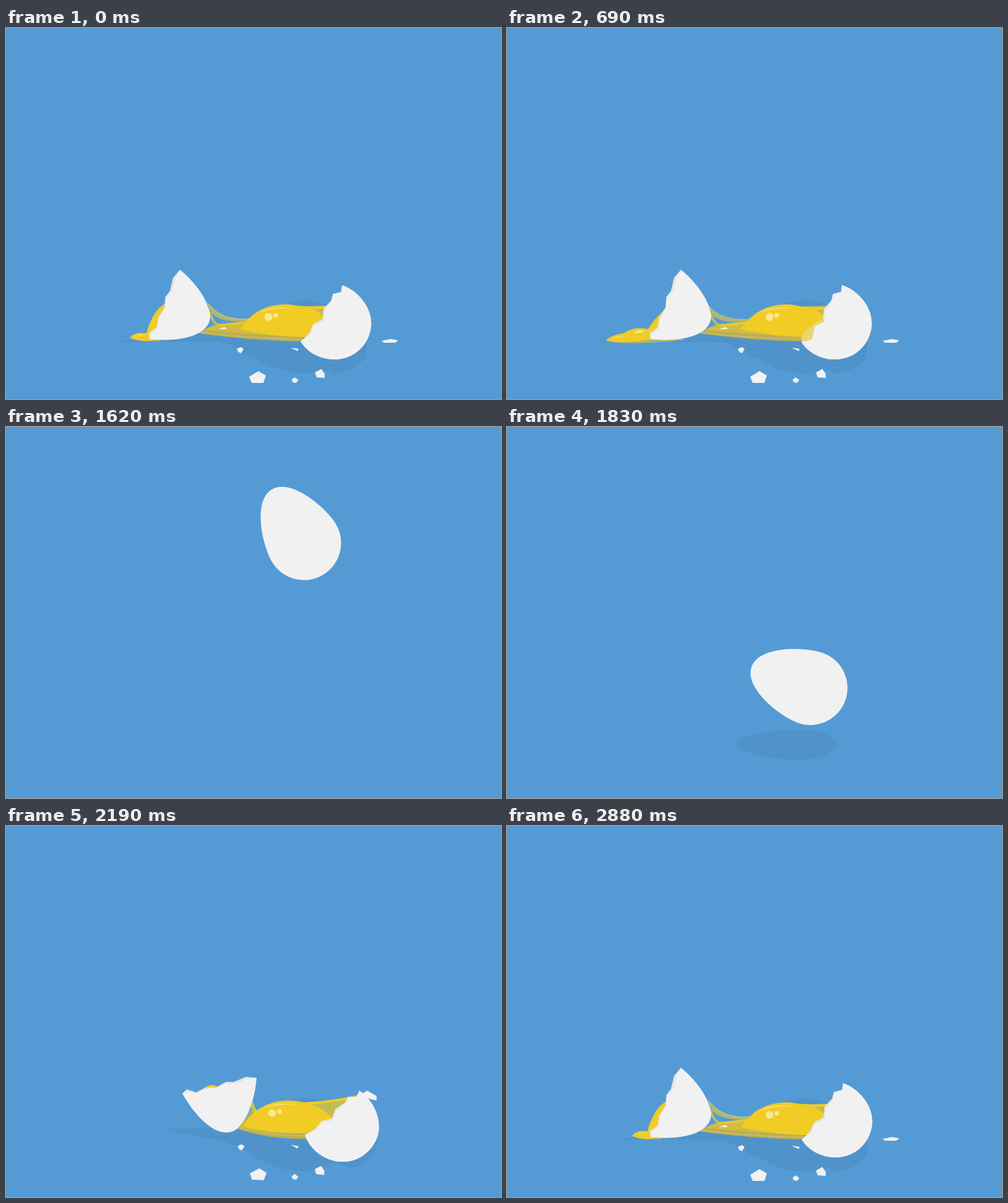
An HTML page that plays this animation: 800 px wide and 600 px high, repeating every 2.91 s.

```html
<!DOCTYPE html>
<html lang="en">
<head>
<meta charset="utf-8">
<title>Dropped egg</title>
<style>
  html, body { margin: 0; width: 100%; height: 100%; overflow: hidden; background: #549bd6; }
  svg { display: block; width: 100vw; height: 100vh; }
</style>
</head>
<body>
<svg id="stage" viewBox="0 0 800 600"></svg>
<script>
const LOOP = 2910, PHASE = 1620, STEP = 30, CRACK = 570;
const YELLOW = '#f0cc25', OCHRE = '#eaba22', WHITE = '#f1f1f1', LIP = '#e5e5e5', PALE = '#f8e88f';
const stage = document.getElementById('stage');

function add(parent, tag, attrs) {
  const node = document.createElementNS('http://www.w3.org/2000/svg', tag);
  set(node, attrs);
  parent.append(node);
  return node;
}
function set(node, attrs) {
  for (const name in attrs) node.setAttribute(name, attrs[name]);
}
function show(node, visible) {
  node.style.display = visible ? '' : 'none';
}

const clamp = v => Math.max(0, Math.min(1, v));
const ease = { linear: k => k, out: k => 1 - (1 - k) ** 2, in: k => k * k };

// Blend two strings of the same structure number by number.
function mix(a, b, k) {
  const ends = b.match(/-?[\d.]+/g);
  let i = 0;
  return a.replace(/-?[\d.]+/g, n => (+n + (ends[i++] - n) * k).toFixed(2));
}
// Each key is [time, value, easing of the way towards it].
function tween(keys, time) {
  const next = keys.findIndex(key => key[0] > time);
  if (next === 0) return keys[0][1];
  if (next < 0) return keys[keys.length - 1][1];
  const [t0, from] = keys[next - 1], [t1, to, name = 'linear'] = keys[next];
  return mix(from, to, ease[name]((time - t0) / (t1 - t0)));
}

// Intact egg
const eggScene = add(stage, 'g', {});
const eggShadow = add(eggScene, 'path', {
  d: 'M367,513C367,500 425,489 470,489C510,489 532,500 532,513C532,527 510,538 470,538C425,538 367,526 367,513Z'
});
const egg = add(eggScene, 'path', {
  d: 'M-60,20.5C-60,-9.5 -37,-80.5 0,-80.5S60,-9.5 60,20.5A60,60 0 0 1 -60,20.5Z', fill: WHITE
});

// Broken egg; each part appears at its first key
const mess = add(stage, 'g', {});
const morphs = [];
function morph(attrs, keys) {
  morphs.push({ node: add(mess, 'path', attrs), keys });
}
const glaze = (opacity, color = YELLOW) => ({ fill: color, 'fill-opacity': opacity });
const line = (color, width, opacity = 1) =>
  ({ fill: 'none', stroke: color, 'stroke-width': width, 'stroke-opacity': opacity });

// Shadow
morph(glaze(.05, '#000'), [
  [570, 'M355,513Q370,526 400,532Q430,537 450,538Q470,538 490,538Q510,537 520,532L530,525Q540,520 540,513L535,505L520,495Q485,487 450,489L420,492L390,500L370,506Z'],
  [900, 'M257,490Q300,502 350,509Q385,522 405,537Q440,558 482,559Q510,556 527,543L560,554Q590,546 600,515L598,500L527,450Q485,432 455,446L420,478L370,488L300,488Z', 'out'],
  [1590, 'M177,508Q250,506 355,509Q385,530 405,535Q440,558 482,559Q505,558 523,552L523,559Q575,556 583,525L582,490L517,447Q485,433 450,446L395,480L300,495L215,502Z', 'out'],
  [2910, 'M107,509Q250,508 355,509Q385,530 405,535Q440,558 482,559Q505,558 523,552L523,559Q575,556 582,525L581,490L517,447Q485,433 450,446L395,480L300,495L150,505Z']
]);

// Egg white between the shells
morph(glaze(.7, OCHRE), [
  [570, 'M430,475Q440,465 450,460Q460,455 470,455L500,470L500,500Q460,500 430,475Z'],
  [900, 'M370,488Q385,478 395,468Q400,462 410,460L500,470L500,506Q420,508 370,488Z', 'out'],
  [1410, 'M311,494Q325,484 338,480Q365,475 400,476L480,480L480,507Q400,506 311,494Z', 'out']
]);
morph(glaze(.4), [
  [570, 'M440,470Q450,460 470,460L495,470L495,488Q460,488 440,470Z'],
  [900, 'M372,485Q388,450 404,462L490,470L490,497Q410,499 372,485Z', 'out'],
  [1410, 'M320,488Q345,477 392,475L480,480L480,499Q400,497 320,488Z', 'out']
]);
morph(line('#e4dc9c', 1.5, .35), [
  [570, 'M440,480Q460,490 480,490'],
  [900, 'M378,488Q420,502 500,501', 'out'],
  [1410, 'M314,492Q390,502 480,503', 'out']
]);

// Web hanging from the left shell
morph(glaze(.58), [
  [570, 'M450,455Q460,460 470,462L470,466Q460,465 452,460Z'],
  [900, 'M396,444Q400,458 408,462L402,466Q396,460 394,452Z', 'out'],
  [1410, 'M325,442Q348,474 392,469L390,474Q345,478 329,458Z', 'out'],
  [1620, 'M325,443Q348,474 392,470L390,474Q345,478 329,458Z'],
  [2310, 'M326,449Q345,474 392,471L390,475Q350,479 330,464Z'],
  [2910, 'M328,457Q345,475 390,472L388,476Q350,480 331,470Z']
]);
morph(line('#e0d98f', 1.2, .55), [
  [570, 'M450,455Q460,460 470,462'],
  [900, 'M396,444Q400,458 408,462', 'out'],
  [1410, 'M325,443Q348,474 392,470', 'out'],
  [2310, 'M326,449Q345,474 392,471'],
  [2910, 'M328,457Q345,475 390,472']
]);
morph(line(YELLOW, 3.5, .75), [
  [570, 'M452,460Q460,465 465,466Q468,466 470,466'],
  [900, 'M398,447Q402,462 405,464Q406,466 408,466', 'out'],
  [1410, 'M329,459Q336,480 345,480Q365,479 392,474', 'out'],
  [2310, 'M330,465Q335,479 345,481Q365,480 392,475'],
  [2910, 'M331,471Q336,480 345,481Q365,480 392,475']
]);

// Web towards the right shell
morph(glaze(.7), [
  [570, 'M470,450Q480,448 490,448L495,480L480,490Z'],
  [900, 'M480,447Q520,446 570,435L545,480L500,490Z', 'out'],
  [1590, 'M470,450Q490,451 518,449L516,470L500,480Z']
]);
morph(line(YELLOW, 4), [
  [570, 'M470,452Q480,450 490,450'],
  [900, 'M480,449Q525,447 570,437', 'out'],
  [1590, 'M470,451Q490,453 518,451.5'],
  [2310, 'M470,452Q490,454 518,453.5']
]);

// Yolk
morph(glaze(1), [
  [570, 'M430,470C440,450 455,440 470,440C485,440 500,450 505,465C505,480 495,492 485,492C460,494 440,485 430,470Z'],
  [900, 'M384,486C398,457 428,444 456,444C490,445 512,455 527,472C520,490 505,497 490,496C450,498 410,493 384,486Z', 'out'],
  [1590, 'M378,487C395,462 418,447 452,447C472,447 478,454 495,454C515,462 530,485 510,500C460,501 420,497 378,487Z']
]);
const shine = add(mess, 'g', { fill: PALE });
add(shine, 'circle', { cx: 424.3, cy: 467.3, r: 6.3 });
add(shine, 'circle', { cx: 436, cy: 464.7, r: 3.8 });
add(shine, 'path', { d: 'M406,461Q432,447 463,454Q432,452 406,461Z', 'fill-opacity': .6 });
const shineKeys = [[570, '24 -3'], [900, '6 -3', 'out'], [1590, '0 0']];

// Puddle running out of the left shell
morph(glaze(.62), [
  [1190, 'M262,500Q264,501 266,500L265,498L262,498Z'],
  [1410, 'M225,505Q238,507 252,506L240,500L232,500Z'],
  [1620, 'M222,505Q235,508 252,506L240,500L230,500Z'],
  [2310, 'M183,509Q235,511 287,504L240,487L215,490Z'],
  [2790, 'M150,508Q230,514 272,505L240,488L205,487Z'],
  [2910, 'M142,508Q230,515 268,505L240,489L200,488Z']
]);
morph(glaze(1), [
  [900, 'M320,424Q333,414 345,424L340,440L325,440Z'],
  [1410, 'M258,444Q238,454 226,496L240,490L262,460Z', 'out'],
  [1620, 'M257,446Q238,455 226,496L240,490L262,460Z'],
  [2310, 'M251,459Q238,470 226,490L240,492L262,470Z'],
  [2790, 'M245,471Q232,480 222,492L236,495L262,478Z'],
  [2910, 'M244,474Q231,482 221,492L236,495L262,480Z']
]);
morph(glaze(1), [
  [1190, 'M260,497Q261,496 262,495Q263,495 264,495L266,495L265,498Q262,499 260,497Z'],
  [1410, 'M214,502Q217,496 222,494Q226,494 232,494L246,488L236,505Q222,506 214,502Z'],
  [1590, 'M202,501Q206,495 217,493Q224,494 232,494L246,488L236,506Q215,508 202,501Z'],
  [1620, 'M200,501Q204,495 216,493Q224,494 232,494L246,488L236,506Q215,508 200,501Z'],
  [2310, 'M160,506Q168,496 188,494Q205,481 232,488L246,480L236,503Q185,512 160,506Z'],
  [2790, 'M140,507Q158,497 178,492Q202,485 224,491L246,478L236,503Q172,514 140,507Z'],
  [2910, 'M135,508Q154,498 174,493Q200,486 222,492L246,478L236,503Q168,514 135,508Z']
]);
morph(glaze(.9, PALE), [
  [1620, 'M232,495Q233,494 234,495Q233,496 232,495Z'],
  [2310, 'M205,493Q212,486 222,490Q215,495 205,493Z'],
  [2790, 'M188,495Q196,488 203,494Q196,497 188,495Z'],
  [2910, 'M183,496Q191,490 198,495Q191,498 183,496Z']
]);
morph(glaze(.55, PALE), [
  [1190, 'M262,497Q263,496 264,497Q263,497 262,497Z'],
  [1410, 'M218,500Q224,495 232,497Q224,498 218,500Z'],
  [1620, 'M205,500Q215,494 228,497Q215,497 205,500Z'],
  [2310, 'M167,503Q182,495 197,499Q182,499 167,503Z'],
  [2790, 'M153,503Q168,495 184,499Q168,499 153,503Z'],
  [2910, 'M149,504Q164,496 180,500Q164,500 149,504Z']
]);
morph(glaze(1, '#c0bd55'), [
  [2310, 'M224,495Q225,495 226,495Q225,495 224,495Z'],
  [2790, 'M211,498Q216,496 221,497Q216,500 211,498Z']
]);

// Splinters fly out of the crack and land
const chips = [
  'M343,487L353,483.5L357,487Z',
  'M393,564L408,555L420,562L416,574L397,574Z',
  'M373,519L379.5,516L384,519L380,526L375.5,524Z',
  'M460,517L473,519L471,522.5Z',
  'M461.5,569L466,565L472.5,569L469,574L463.5,573Z',
  'M499.5,557L509.5,551.5L515,559L515,566L502,565Z'
].map(d => {
  const [x, y] = d.match(/[\d.]+/g).map(Number);
  return { x, y, node: add(mess, 'path', { d, fill: WHITE }) };
});
morph(glaze(1, WHITE), [
  [570, 'M500,455L511,447L526,456L526,463L513,460Z'],
  [900, 'M573,434L584,428L599,437L599,444L586,441Z', 'out'],
  [1150, 'M607,506L622,503L634,505L629,509L611,509Z', 'in']
]);

// Shell halves: the lip in grey, the outside on top of it
function shell(rim, outerRim, back) {
  const group = add(mess, 'g', {});
  add(group, 'path', { d: rim + back, fill: LIP });
  add(group, 'path', { d: outerRim + back, fill: WHITE });
  return group;
}
const leftShell = shell(
  'M281,391L270,404L265,425L257.5,435L256,452L246,468L243.5,484L230.5,493.5L232,503',
  'M281,391L274,405L269,425L259,437L257,453L248,469L245,486L234,495L232,503',
  'C275,508 330,500 330,465C326,437 303,409 281,391Z');
const rightShell = shell(
  'M543,416L541,427L528,430L525,441L513,454L511,471L496,479L490,493L476,507',
  'M543,416L542,427L529,431L526,442L515,457L513,474L497,481L491,497L476,507',
  'C486,524 507,536 531,536A59,59 0 0 0 590,477C590,450 567,424 543,416Z');
const smear = add(rightShell, 'path', {
  d: 'M476,507L476,499L484,487L497,480L513,470L513,475L498,482L493,503Z', fill: '#ead671'
});
const rightKeys = [
  [570, '490 469 -22'], [880, '543.5 484 15', 'out'], [1590, '530.3 477 0'], [2310, '529.5 477 -1']
];

function drawEgg(time) {
  const k = Math.max(0, time - 15) / 315;
  set(egg, { transform: `translate(471 ${102.5 + 67.5 * k ** 3}) rotate(${-31 * k ** 1.6})` });
  set(eggShadow, { 'fill-opacity': .05 * clamp((time - 350) / 150) });
}

function drawMess(time) {
  for (const { node, keys } of morphs) {
    show(node, time >= keys[0][0]);
    set(node, { d: tween(keys, time) });
  }
  set(shine, { transform: `translate(${tween(shineKeys, time)})` });

  const rest = 1 - clamp((time - CRACK) / 840);
  const turn = 170 * rest ** 2.28;
  set(leftShell, {
    transform: `translate(${143.5 * rest ** 1.63} ${-7 * Math.min(1, turn / 54)}) rotate(${turn} 288.5 461)`
  });
  const [x, y, angle] = tween(rightKeys, time).split(' ');
  set(rightShell, { transform: `translate(${x} ${y}) rotate(${angle}) translate(-530 -477)` });
  set(smear, { opacity: clamp((time - 1620) / 400) });

  const left = 1 - ease.out(clamp((time - CRACK) / 375));
  for (const chip of chips) {
    const dx = left * (471 - chip.x), dy = left * (464 - chip.y) - 60 * left * (1 - left);
    set(chip.node, { transform: `translate(${dx} ${dy}) rotate(${200 * left} ${chip.x} ${chip.y})` });
  }
}

function draw(elapsed) {
  const time = (Math.floor(elapsed / STEP) * STEP + PHASE) % LOOP;
  const whole = time < CRACK;
  show(eggScene, whole);
  show(mess, !whole);
  (whole ? drawEgg : drawMess)(time);
}

const start = performance.now();
function frame() {
  draw(performance.now() - start);
  requestAnimationFrame(frame);
}
frame();
</script>
</body>
</html>
```
